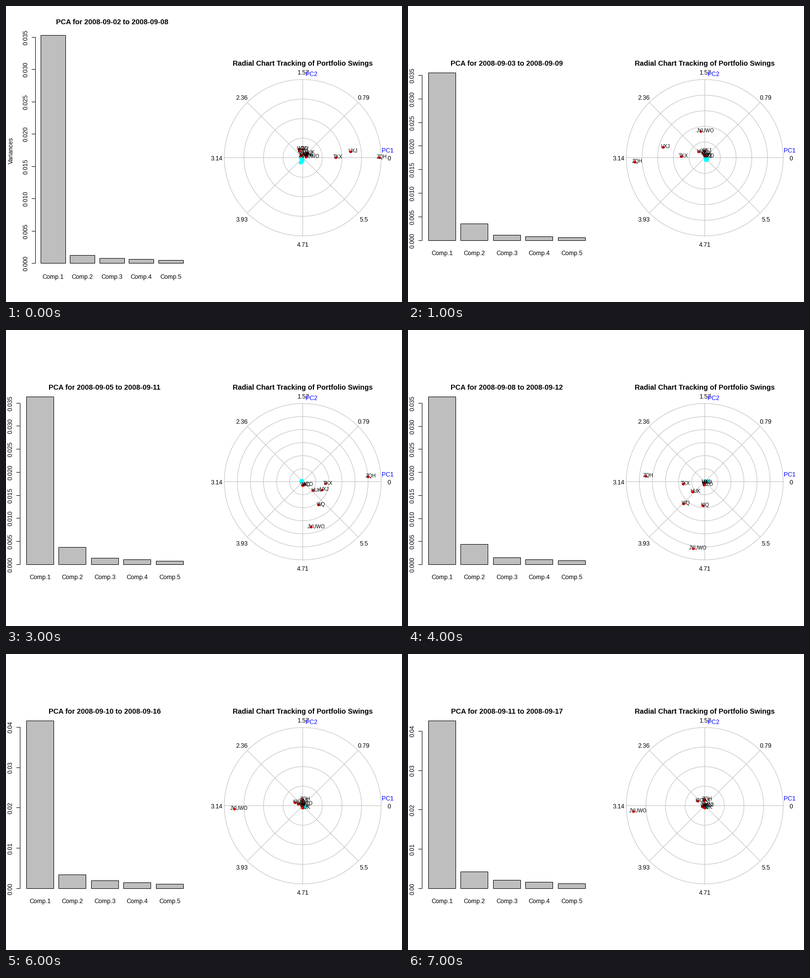
A matplotlib script for the animation above (8000 ms loop, 800x600 px).

```python
import numpy as np
import matplotlib.pyplot as plt
from matplotlib.animation import FuncAnimation
from matplotlib.patches import Rectangle

W, H, DPI = 800, 600, 100
PT = 72 / DPI  # points per pixel
GREY = "#bebebe"
CX, CY, R = 599, 307, 158.5
VIEWS, WINDOW = 8, 5

WEEKDAYS = [d for d in range(2, 18) if (d - 1) % 7 < 5]
RINGS = [4, 5, 5, 6, 6, 4, 4, 4]
SIDE = [1, -1, -1, 1, -1, -1, -1, -1]  # sign of the first component
RISE = [1, 1, -1, -1, -1, 1, 1, 1]     # sign of the second component

# Key points (view, PC1, PC2) in pixels, before the signs are applied
TRACKS = {
    "ZQH": [(0, 154, 1), (1, 142, -8), (2, 143, -10), (4, 120, -12),
            (5, 1, 13)],
    "TKX": [(0, 66, 1), (1, 48, 3), (4, 44, 4), (5, 2, 10)],
    "UXJ": [(0, 96, 13), (2, 73, 31), (4, 3, 1)],
    "JYUWO": [(0, 6, 2), (1, 9, 54), (2, 9, 48), (4, 24, 135), (5, 133, -1),
              (7, 145, -11)],
    "WQ": [(1, -1, 4), (2, 18, 49), (4, 44, 44), (5, 13, 9), (7, 6, -1)],
    "KIQ": [(4, 4, 48), (5, 16, 4), (7, 15, 10)],
    "HUK": [(0, 8, 10), (4, 25, 20), (5, 1, -4)],
}
CROWD = ["WZO", "WKJ", "VWI", "YXE", "QIV", "XOU", "OIZ", "YWU"]

plt.rcParams["font.family"] = "Liberation Sans"
plt.rcParams["toolbar"] = "None"

fig = plt.figure(figsize=(W / DPI, H / DPI), dpi=DPI, facecolor="white")
ax = fig.add_axes([0, 0, 1, 1])


def label(x, y, s, size=12.4, ha="center", **kw):
    """Text whose capitals are centred on (x, y)."""
    shift = 0.36 * size
    if kw.get("rotation"):
        x += shift
    else:
        y += shift
    ax.text(x, y, s, fontsize=size * PT, ha=ha, va="baseline",
            rotation_mode="anchor", **kw)


def line(xs, ys, color="black"):
    ax.plot(xs, ys, color=color, lw=PT, snap=False,
            solid_capstyle="projecting")


def dots(xs, ys, color, size=5.5):
    ax.scatter(xs, ys, s=(size * PT) ** 2, color=color, linewidths=0, zorder=3)


def bar_heights(i, full):
    second = np.interp(i, [0, 1, 3, 4, 5, 7], [16, 34, 35, 41, 21, 34])
    tail = (10 + i) * 0.75 ** np.arange(3)
    return np.round([full, second, *tail])


def bar_chart(i):
    if i == 0:
        axis_x, left, step, base, full = 59, 70, 59.5, 521, 462
        title_x, title_y, name_y = 214, 31, 548
        label(9, 292, "Variances", rotation=90)
    else:
        axis_x, left, step, base, full = 28, 41, 65.5, 475, 340
        title_x, title_y, name_y = 199, 115, 500
    first, last = WEEKDAYS[i], WEEKDAYS[i + WINDOW - 1]
    label(title_x, title_y,
          f"PCA for 2008-09-{first:02d} to 2008-09-{last:02d}",
          14.4, weight="bold")

    width = step / 1.2
    for k, h in enumerate(bar_heights(i, full)):
        x = int(left + k * step)
        ax.add_patch(Rectangle((x, base - h), round(width), h, fc=GREY,
                               ec="black", lw=PT, snap=False))
        label(x + width / 2, name_y, f"Comp.{k + 1}")

    lead = np.interp(i, [0, 1, 2, 4, 5, 7],
                     [0.0353, 0.0355, 0.0363, 0.0364, 0.0405, 0.0426])
    unit, digits = (0.005, 3) if lead < 0.04 else (0.01, 2)
    ticks = unit * np.arange(int(lead / unit) + 1)
    ys = np.round(base - full * ticks / lead)
    line([axis_x, axis_x], [base, ys[-1]])
    for t, y in zip(ticks, ys):
        line([axis_x - 7, axis_x], [y, y])
        label(axis_x - 20, y, f"{t:.{digits}f}", rotation=90)


def radial_grid(rings):
    turn = np.linspace(0, 2 * np.pi, 101)
    for k in range(1, rings + 1):
        r = R * k / rings
        line(CX + r * np.cos(turn), CY - r * np.sin(turn), GREY)
    for k in range(8):
        a = k * np.pi / 4
        c, s = np.cos(a), np.sin(a)
        line([CX, CX + R * c], [CY, CY - R * s], GREY)
        label(599.2 + 174.3 * c, 308.5 - 174.5 * s, f"{round(a, 2):g}")
    label(771, 292, "PC1", color="blue")
    label(617, 137, "PC2", color="blue")


def loadings(i, rng):
    """Labelled points: the tracked ones and a crowd that closes in."""
    points = {}
    for name, keys in TRACKS.items():
        when, pc1, pc2 = zip(*keys)
        if i >= when[0]:
            points[name] = np.interp(i, when, pc1), np.interp(i, when, pc2)
    shrink = 0.75 ** i
    for name in CROWD[:max(2, 8 >> i)]:
        points[name] = rng.uniform(-9, 9) * shrink, rng.uniform(3, 21) * shrink
    return points


def radial_chart(i):
    label(599, 115, "Radial Chart Tracking of Portfolio Swings", 14.4,
          weight="bold")
    radial_grid(RINGS[i])

    rng = np.random.default_rng(i)
    n = round(24 * 0.8 ** i)
    tall = 1.5 + 7 * 0.25 ** i
    dots(CX - 2.5 * SIDE[i] + rng.uniform(-3, 3, n),
         CY + 2 * RISE[i] + rng.uniform(-tall, tall, n), "cyan")
    for name, (pc1, pc2) in loadings(i, rng).items():
        x, y = CX + SIDE[i] * pc1, CY - RISE[i] * pc2
        dots([x], [y], "red")
        label(x - 1.45 * len(name), y - 1, name, 9.9, ha="left", zorder=4)


def draw(i):
    ax.clear()
    ax.set_xlim(-0.5, W - 0.5)
    ax.set_ylim(H - 0.5, -0.5)
    ax.axis("off")
    bar_chart(i)
    radial_chart(i)
    return []


anim = FuncAnimation(fig, draw, frames=VIEWS, interval=1000,
                     init_func=lambda: draw(0), repeat=True, repeat_delay=0)
plt.show()
```
